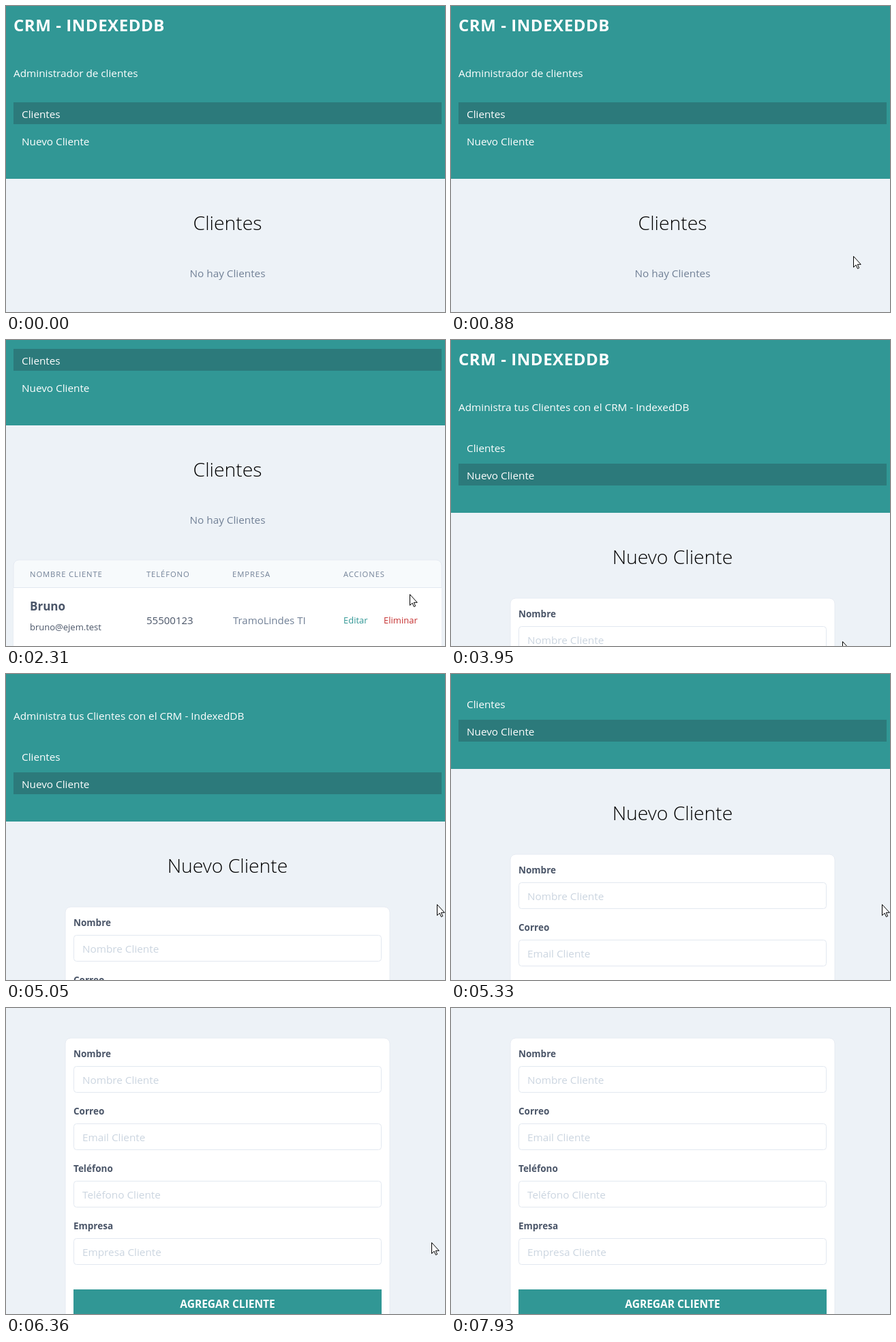
Write an HTML page that moves like this. It is 644 by 448 pixels and loops after 9.06 s.

```html
<!DOCTYPE html>
<html lang="es">
<head>
<meta charset="utf-8">
<title>CRM - IndexedDB</title>
<style>
html, body { margin: 0; width: 100%; height: 100%; overflow: hidden; background: #edf2f7; }
svg { display: block; width: 644px; height: 448px; font-family: "Open Sans", "Noto Sans", sans-serif; }
</style>
</head>
<body>
<svg id="stage" viewBox="0 0 644 448" xmlns="http://www.w3.org/2000/svg"></svg>
<script>
const LOOP = 9060, SWITCH = 3950, BODY = 15.3;
const TEAL = '#319795', DARK = '#2c7a7b', SLATE = '#4a5568', GRAY = '#718096', LINE = '#e2e8f0';
const BOLD = { 'font-weight': 700 };
const MID = { 'text-anchor': 'middle' };
const stage = document.getElementById('stage');

function add(parent, tag, attrs, content) {
  const el = document.createElementNS('http://www.w3.org/2000/svg', tag);
  for (const k in attrs) el.setAttribute(k, attrs[k]);
  if (content) el.textContent = content;
  parent.appendChild(el);
  return el;
}

function text(parent, x, y, size, fill, content, extra) {
  return add(parent, 'text', { x, y, 'font-size': size, fill, ...extra }, content);
}

function rect(parent, x, y, width, height, fill, extra) {
  return add(parent, 'rect', { x, y, width, height, fill, ...extra });
}

function page(intro, active, heading) {
  const g = add(stage, 'g', {});
  rect(g, 0, 0, 644, 253, TEAL);
  rect(g, 11, 141 + 40 * active, 628, 32, DARK);
  text(g, 11, 37, 24, '#fff', 'CRM - INDEXEDDB', { ...BOLD, 'letter-spacing': 0.55 });
  text(g, 11, 104, BODY, '#fff', intro);
  ['Clientes', 'Nuevo Cliente'].forEach((item, i) => text(g, 23, 164 + 40 * i, BODY, '#fff', item));
  text(g, 325, 328, 28.3, '#000', heading, { ...MID, 'font-weight': 300 });
  return g;
}

function card(parent, x, y, w, h, fill) {
  rect(parent, x, y + 1, w, h, '#000', { rx: 8, opacity: 0.06 });
  rect(parent, x, y, w, h, fill, { rx: 8, stroke: LINE, 'stroke-width': 0.8 });
}

function buildList() {
  const g = page('Administrador de clientes', 0, 'Clientes');
  text(g, 325, 397, BODY, GRAY, 'No hay Clientes', MID);
  card(g, 11, 450, 628, 200, '#f7fafc');
  rect(g, 11, 491, 628, 150, '#fff');
  rect(g, 11, 490, 628, 1, LINE);
  const heads = { 35: 'NOMBRE CLIENTE', 206: 'TELÉFONO', 332: 'EMPRESA', 495: 'ACCIONES' };
  for (const x in heads) text(g, x, 475, 11.25, GRAY, heads[x], { 'letter-spacing': 0.9 });
  text(g, 35, 524, 17, SLATE, 'Bruno', BOLD);
  text(g, 35, 553, 13, SLATE, 'bruno@ejem.test');
  text(g, 206, 544, 15, SLATE, '55500123');
  text(g, 333, 544, 15, GRAY, 'TramoLindes TI');
  text(g, 495, 543, 13, TEAL, 'Editar');
  text(g, 554, 543, 13, '#c53030', 'Eliminar');
  return g;
}

function buildForm() {
  const g = page('Administra tus Clientes con el CRM - IndexedDB', 1, 'Nuevo Cliente');
  card(g, 87, 378, 476, 460, '#fff');
  ['Nombre', 'Correo', 'Teléfono', 'Empresa'].forEach((label, i) => {
    const y = 84 * i;
    const hint = label === 'Correo' ? 'Email' : label;
    text(g, 99, 406 + y, 13.5, SLATE, label, BOLD);
    rect(g, 99.5, 419.5 + y, 451, 38, '#fff', { rx: 4, stroke: LINE });
    text(g, 112, 445 + y, BODY, '#cbd5e0', hint + ' Cliente');
  });
  rect(g, 99, 746, 452, 44, TEAL);
  text(g, 325, 773, 15.5, '#fff', 'AGREGAR CLIENTE', { ...MID, ...BOLD });
  return g;
}

const list = buildList();
const form = buildForm();
const pointer = add(stage, 'path', {
  d: 'M.5 .5v16l3.6-3.4 2.4 5.4 2.2-1-2.4-5.2h5z', fill: '#fff', stroke: '#000'
});

const linear = p => p;
const easeIn = n => p => p ** n;
const easeOut = n => p => 1 - (1 - p) ** n;

// A move shows its first step at `start` and its last one at `end`.
function move(start, end, steps, from, to, ease = linear) {
  return { start, end, steps, from, to, ease };
}

function valueAt(moves, t) {
  const m = moves.filter(m => m.start <= t).pop();
  if (!m) return moves[0].from;
  const i = Math.floor((t - m.start) / (m.end - m.start) * (m.steps - 1) + 0.1);
  const p = m.ease(Math.min(1, (i + 1) / m.steps));
  return m.from.map((v, k) => Math.round(v + (m.to[k] - v) * p));
}

const listScroll = [move(1280, 1780, 8, [0], [128], easeOut(2.42))];
const formScroll = [
  move(4910, 5810, 14, [0], [289], easeIn(1.34)),
  move(5880, 6360, 8, [289], [334], easeOut(2))
];
const pointerMoves = [
  move(330, 880, 9, [601, 452], [590, 366], easeOut(1.5)),
  move(2310, 2940, 10, [590, 366], [617, 452], easeIn(1.15)),
  move(3950, 4840, 14, [569, 449], [632, 337]),
  move(5400, 5810, 6, [632, 337], [632, 342]),
  move(5880, 6360, 8, [632, 342], [624, 343]),
  move(6630, 6830, 3, [624, 343], [623, 342]),
  move(7030, 7930, 14, [623, 342], [587, 452])
];

function draw(ms) {
  const t = ms % LOOP;
  const [shown, hidden, scroll] = t < SWITCH ? [list, form, listScroll] : [form, list, formScroll];
  shown.style.display = '';
  hidden.style.display = 'none';
  shown.setAttribute('transform', `translate(0 ${-valueAt(scroll, t)[0]})`);
  pointer.setAttribute('transform', `translate(${valueAt(pointerMoves, t).join(' ')})`);
}

const begin = performance.now();
function tick() {
  draw(performance.now() - begin);
  requestAnimationFrame(tick);
}
draw(0);
requestAnimationFrame(tick);
</script>
</body>
</html>
```
